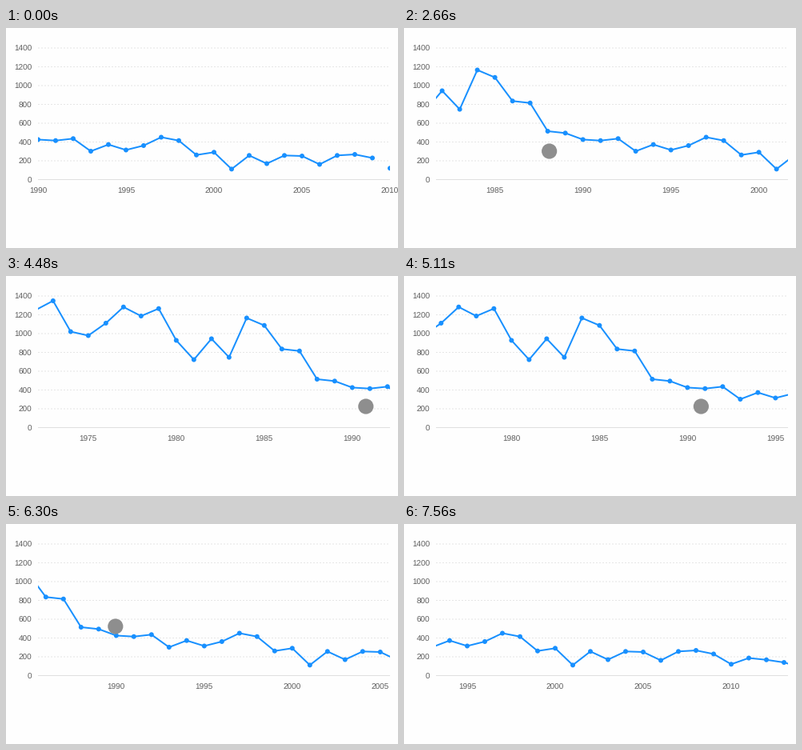
Recreate the animation shown at these times as a matplotlib script. Size 490 by 275 pixels, loop 8.32 s.

```python
import math
import numpy as np
import matplotlib.pyplot as plt
from matplotlib.animation import FuncAnimation
from matplotlib.patches import Circle, Rectangle

W, H, DPI = 490, 275, 100
LOOP, STEP = 8320, 20
LEFT, RIGHT, BASE = 40, 480, 189.5
YEAR_W, UNIT = 22, 0.1175
PX = 72 / DPI
BLUE, GREY = "#1890ff", "#8e8e8e"

plt.rcParams.update({"font.family": "Liberation Sans",
                     "text.hinting": "none", "text.hinting_factor": 1})

# The plotted series, one value a year
values = np.array([
    1250, 1349, 1021, 979, 1111, 1283, 1187, 1266, 928, 723, 945,
    748, 1166, 1087, 836, 815, 515, 495, 426, 415, 436,
    302, 373, 315, 362, 451, 415, 262, 291, 112, 257, 170,
    257, 251, 162, 257, 268, 230, 121, 187, 168, 140, 85])
years = 1972 + np.arange(len(values))
ys = BASE - values * UNIT


def glide(u):
    return u * u * (3 - 2 * u)


def fling(u):
    return math.sin(u * math.pi / 2)


# Each touch: start, end, chart shift it reaches, finger x and y, easing
TOUCHES = [
    (1580, 2390, 166, 72, 163, fling),
    (2490, 3310, 309, 164, 154, glide),
    (3360, 4140, 398, 209, 156, glide),
    (4200, 4370, 398, 455, 162, glide),
    (4370, 5170, 313, 455, 163, glide),
    (5220, 6020, 136, 400, 155, glide),
    (6130, 6920, 27, 175, 128, fling),
    (6980, 7200, -71, 234, 146, fling),
    (7200, 7560, -71, 136, 146, fling)]


def state_at(t):
    """Chart shift and finger centre; the centre is None while lifted."""
    shift, spot = 0, None
    if 820 <= t < 1580:
        u = min((t - 820) / 340, 1)
        spot = 295 - 247 * u, 60 + 106 * u
    for start, end, reach, x, y, ease in TOUCHES:
        if t < start:
            break
        moved = (reach - shift) * ease(min((t - start) / (end - start), 1))
        shift += moved
        spot = (x + moved, y) if t < end else None
    return shift, spot


fig = plt.figure(figsize=(W / DPI, H / DPI), dpi=DPI, facecolor="#fefefe")
ax = fig.add_axes([0, 0, 1, 1])
ax.set(xlim=(0, W), ylim=(H, 0))
ax.axis("off")


def label(x, y, text, align):
    return ax.text(x, y, text, ha=align, va="baseline",
                   fontsize=10.5 * PX, color="#5c5c5c")


for value in range(0, 1401, 200):
    y = BASE - value * UNIT
    style, color = (":", "#e6e6e6") if value else ("-", "#e0e0e0")
    rule, = ax.plot([LEFT, RIGHT], [y, y], color=color, lw=PX, snap=False,
                    solid_capstyle="butt", zorder=1)
    if style == ":":
        rule.set(linestyle=(0, (2, 2)), dash_capstyle="butt")
    label(32.5, y + 4, str(value), "right")

ticks = {year: label(0, 207.3, str(year), "center")
         for year in range(1975, 2011, 5)}

window = Rectangle((LEFT, 0), RIGHT - LEFT, H, transform=ax.transData)
line, = ax.plot([], [], color=BLUE, lw=2 * PX, solid_joinstyle="round",
                solid_capstyle="butt", zorder=3)
line.set_clip_path(window)

dots = [Circle((0, y), 3, color=BLUE, lw=0, zorder=4) for y in ys]
for dot in dots:
    ax.add_patch(dot)
    dot.set_clip_path(window)

finger = Circle((0, 0), 9.6, color=GREY, lw=0, zorder=6)
ax.add_patch(finger)


def update(i):
    t = i * STEP + STEP / 2
    shift, spot = state_at(t)
    xs = LEFT + shift + (years - 1990) * YEAR_W

    # The last visible segment is still missing when the chart appears
    drawn = years <= (2009 if t < 50 else years[-1])
    line.set_data(xs[drawn], ys[drawn])

    for dot, x, y in zip(dots, xs, ys):
        dot.center = x, y
        dot.set_visible(LEFT - 3 < x < RIGHT + 3)

    for year, text in ticks.items():
        x = LEFT + shift + (year - 1990) * YEAR_W
        text.set_x(x)
        text.set_visible(LEFT - 0.5 <= x <= RIGHT + 0.5)

    finger.set_visible(spot is not None)
    if spot is not None:
        finger.center = spot
    return []


anim = FuncAnimation(fig, update, frames=LOOP // STEP, interval=STEP,
                     repeat=True, repeat_delay=0, blit=False)
plt.show()
```
